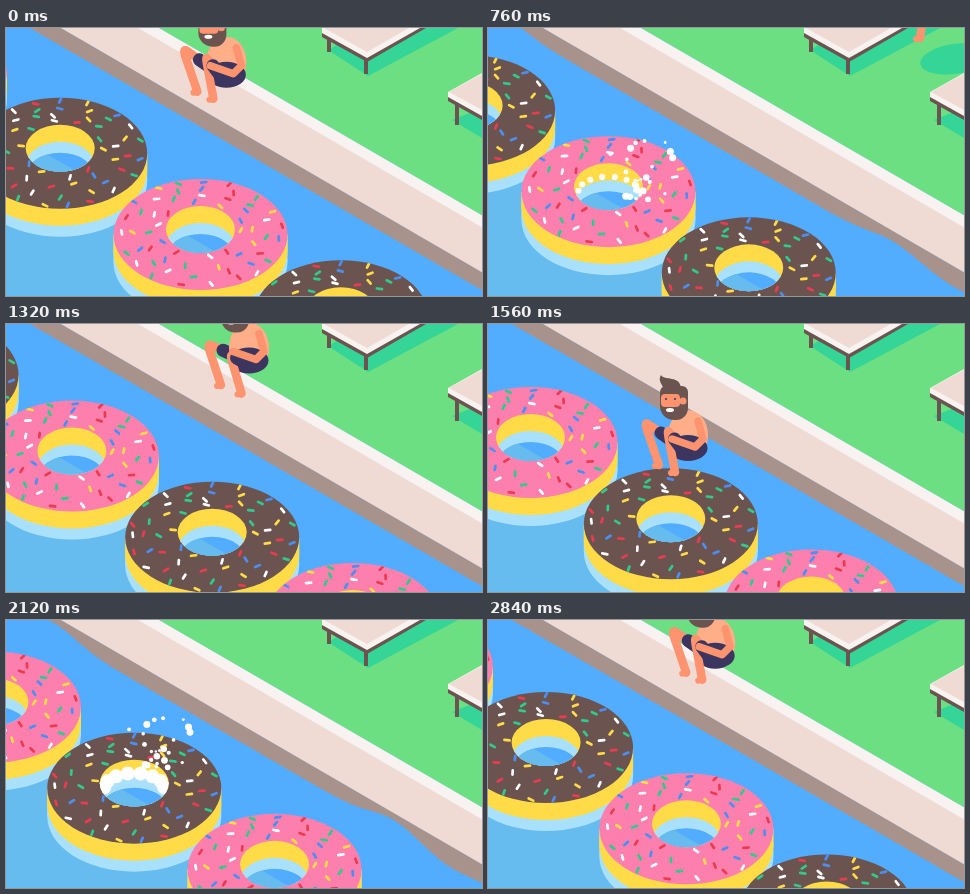
Write an HTML page with a canvas that moves like this. It is 476x268 px and loops after 2.88 s.

```html
<!DOCTYPE html>
<html lang="en">
<head>
<meta charset="utf-8">
<title>Pool jump</title>
<style>
html, body { margin: 0; width: 100%; height: 100%; overflow: hidden; background: #52acff; }
canvas { display: block; width: 100vw; height: 100vh; }
</style>
</head>
<body>
<canvas width="476" height="268"></canvas>
<script>
const ctx = document.querySelector('canvas').getContext('2d');
const W = 476, H = 268, LOOP = 2880, HALF = LOOP / 2, SLOPE = 0.58, TAU = Math.PI * 2;
const STEP_X = 140.3, STEP_Y = 81.2;
const RING = { rx: 87, ry: 55.5 }, HOLE = { rx: 34.5, ry: 23.5, lift: 5 };
const SIDE = 17, REFLECTION = 28, WALL_TOP = 55;
const C = {
  water: '#52acff', shallow: '#66bbef', foam: '#a9e1fc', grass: '#6bdf82', shade: '#35d497',
  deck: '#efdbd4', rim: '#f8f2f1', wall: '#a8928c', wood: '#6b544f', pink: '#fd7fad',
  yellow: '#ffdc47', skin: '#fd946f', back: '#ffae88', navy: '#3b355f', white: '#fff'
};
const SPRINKLES = [C.white, C.yellow, '#e93c50', '#31ca8d', '#4b8ff3'];

function seeded(seed) {
  return () => {
    seed = (seed * 16807) % 2147483647;
    return seed / 2147483647;
  };
}

function ellipse(x, y, rx, ry, color, turn = 0) {
  ctx.beginPath();
  ctx.ellipse(x, y, rx, ry, turn, 0, TAU);
  ctx.fillStyle = color;
  ctx.fill();
}

const dot = (x, y, r, color) => ellipse(x, y, r, r, color);

function trace(...p) {
  ctx.beginPath();
  for (let i = 0; i < p.length; i += 2) ctx.lineTo(p[i], p[i + 1]);
}

function poly(color, ...p) {
  trace(...p);
  ctx.closePath();
  ctx.fillStyle = color;
  ctx.fill();
}

function line(color, width, ...p) {
  trace(...p);
  ctx.strokeStyle = color;
  ctx.lineWidth = width;
  ctx.stroke();
}

function clipped(makePath, paint) {
  ctx.save();
  makePath();
  ctx.clip();
  paint();
  ctx.restore();
}

// Area between the slanted lines that cross y = 0 at x0 and x1.
function band(x0, x1) {
  trace(x0, 0, x1, 0, W, (W - x1) * SLOPE, W, (W - x0) * SLOPE);
}

function fillBand(color, x0, x1) {
  band(x0, x1);
  ctx.fillStyle = color;
  ctx.fill();
}

function water() {
  ctx.fillStyle = C.water;
  ctx.fillRect(0, 0, W, H);
  poly(C.shallow, 0, 102.5, 286, 268, 0, 268);
}

// Two ripples run along the wall, away from the drifting splash.
function ripple(x, p) {
  if (p < 260 || p > 940) return 0;
  const age = p - 400;
  const d = Math.abs(x - 245 + 0.1 * age) - 80 - 0.32 * age;
  const strength = Math.min(1, (p - 260) / 120) * Math.min(1, (940 - p) / 330);
  return strength * (5 * Math.exp(-(((d - 58) / 26) ** 2)) - 14 * Math.exp(-((d / 32) ** 2)));
}

function wall(p) {
  ctx.beginPath();
  ctx.moveTo(WALL_TOP, 0);
  ctx.lineTo(W, (W - WALL_TOP) * SLOPE);
  for (let x = W; x >= 0; x -= 4) ctx.lineTo(x, (x - 24) * SLOPE + ripple(x, p));
  ctx.lineTo(0, -28);
  ctx.fillStyle = C.wall;
  ctx.fill();
}

function loungers() {
  ctx.lineCap = 'butt';
  line(C.wood, 4, 323, 9, 323, 24);
  line(C.wood, 4, 360, 30, 360, 46);
  line(C.wood, 4, 451, 73, 451, 97);
  poly(C.wood, 316, 4, 361, 29, 361, 34, 316, 9);
  poly(C.wood, 361, 29, 411, 0, 420, 0, 361, 34);
  poly(C.rim, 316, 0, 414, 0, 361, 30, 316, 5);
  poly(C.deck, 318, 0, 403, 0, 361, 24);
  poly(C.wood, 442, 67, 476, 86, 476, 92, 442, 73);
  poly(C.rim, 442, 64, 476, 45, 476, 88, 442, 69);
  poly(C.deck, 443, 64, 476, 46, 476, 82);
}

function garden(shadow) {
  fillBand(C.grass, 153, 1000);
  poly(C.shade, 322, 22, 362, 48, 452, 0, 360, 0);
  poly(C.shade, 446, 92, 476, 110, 476, 80);
  if (shadow) shadow(C.shade);
  loungers();
  fillBand(C.deck, WALL_TOP, 133);
  fillBand(C.rim, 132, 153);
  if (shadow) clipped(() => band(WALL_TOP, 153), () => shadow('#d3c1bc'));
}

function makeSprinkles(seed) {
  const rnd = seeded(seed), list = [];
  [[0.13, 10], [0.38, 13], [0.64, 16], [0.89, 19]].forEach(([s, n], row) => {
    for (let i = 0; i < n; i++) {
      const a = (i + row * 0.4 + rnd() * 0.5) / n * TAU;
      const k = s + (rnd() - 0.5) * 0.12;
      list.push({
        x: Math.cos(a) * (HOLE.rx + (RING.rx - HOLE.rx) * k),
        y: Math.sin(a) * (HOLE.ry + (RING.ry - HOLE.ry) * k) - HOLE.lift * (1 - k),
        turn: rnd() * Math.PI,
        color: SPRINKLES[(i * 2 + row + Math.floor(rnd() * 2)) % 5]
      });
    }
  });
  return list;
}

const toppings = [
  { color: C.pink, sprinkles: makeSprinkles(71) },
  { color: C.wood, sprinkles: makeSprinkles(523) }
];

function ringPath(x, y) {
  ctx.beginPath();
  ctx.ellipse(x, y, RING.rx, RING.ry, 0, 0, TAU);
}

function holePath(x, y) {
  ctx.beginPath();
  ctx.ellipse(x, y - HOLE.lift, HOLE.rx, HOLE.ry, 0, 0, TAU);
}

function ring(x, y, topping) {
  const fill = (path, drop, color) => {
    path(x, y + drop);
    ctx.fillStyle = color;
    ctx.fill();
  };
  const side = (color, drop) => {
    fill(ringPath, drop, color);
    ctx.fillRect(x - RING.rx, y, RING.rx * 2, drop);
  };
  side(C.foam, REFLECTION);
  side(C.yellow, SIDE);
  fill(ringPath, 0, topping.color);
  ctx.lineCap = 'round';
  clipped(() => ringPath(x, y), () => {
    for (const s of topping.sprinkles) {
      const dx = Math.cos(s.turn) * 2.6, dy = Math.sin(s.turn) * 2.1;
      line(s.color, 2.7, x + s.x - dx, y + s.y - dy, x + s.x + dx, y + s.y + dy);
    }
  });
  fill(holePath, 0, C.yellow);
  clipped(() => holePath(x, y), () => {
    fill(holePath, SIDE, C.foam);
    clipped(() => holePath(x, y + REFLECTION), water);
  });
}

// Everything above the front lip of the hole.
function aboveLip(x, y) {
  ctx.beginPath();
  ctx.rect(0, -200, W, 200 + y - HOLE.lift);
  ctx.ellipse(x, y - HOLE.lift, HOLE.rx, HOLE.ry, 0, 0, Math.PI);
}

const drops = (() => {
  const rnd = seeded(97);
  return Array.from({ length: 24 }, (_, i) => ({
    start: (i / 23 - 0.5) * 60,
    drift: (rnd() - 0.5) * 0.06,
    lift: 0.4 + rnd() * 0.13,
    r: 1.2 + rnd() * 2.5
  }));
})();

function splash(x, y, p) {
  const cy = y - HOLE.lift;
  if (p > 190 && p < 630) {
    const h = 38 * Math.sin((p - 190) / 440 * Math.PI);
    clipped(() => aboveLip(x, y), () => {
      ellipse(x, cy, 34, HOLE.ry, C.white);
      ctx.fillRect(x - 34, cy - h + 8, 68, h);
      for (let i = 0; i < 8; i++) {
        const a = i / 7 * Math.PI;
        dot(x - Math.cos(a) * 26, cy - h + 7 - Math.sin(a) * 5 - (i * 5 % 4) * 1.6, 7.5 + i % 3, C.white);
      }
    });
  }
  if (p >= 560 && p < 820) {
    const r = 7 * Math.min(1, (820 - p) / 140);
    clipped(() => holePath(x, y), () => {
      for (let i = 0; i < 8; i++) {
        const a = Math.PI * (1.02 + i / 7 * 0.96);
        dot(x + Math.cos(a) * 30, cy + 5 + Math.sin(a) * 15, r, C.white);
      }
    });
  }
  const age = p - 260;
  if (age <= 0) return;
  for (const d of drops) {
    const up = d.lift * age - 0.00077 * age * age;
    if (up > 0) dot(156 + d.start * (1 - age / 1300) + d.drift * age, 183 - up, d.r, C.white);
  }
}

// time, body x y, then far knee, far foot, near knee, near foot relative to the body
const POSES = [
  [760, 467, -75, 10, 45, 40, 60, -28, 42, -35, 85],
  [880, 409, -33, -5, 48, 0, 88, 0, 45, 25, 70],
  [1000, 350, 8, -30, 42, -37, 84, 13, 50, 41, 59],
  [1080, 311, 38, -34, 48, -23, 87, 13, 46, 24, 47],
  [1160, 284, 50, -30, 40, 2, 74, -20, 30, 0, 60],
  [1280, 250, 28, -38, 5, -25, 45, -15, 20, 0, 55],
  [1360, 232, 19, -42, -14, -27, 30, -19, -6, -11, 37]
];

function poseAt(t) {
  const last = POSES[POSES.length - 1];
  if (t >= last[0]) {
    const fall = t - last[0];
    return [t, last[1] - 0.17 * fall, last[2] + 0.0023 * fall * fall, ...last.slice(3)];
  }
  const i = POSES.findIndex(k => k[0] > t);
  const a = POSES[i - 1], b = POSES[i], u = (t - a[0]) / (b[0] - a[0]);
  return a.map((v, j) => v + (b[j] - v) * u);
}

function leg(hx, hy, kx, ky, fx, fy) {
  const thigh = u => [hx + (kx - hx) * u, hy + (ky - hy) * u];
  ctx.lineCap = ctx.lineJoin = 'round';
  ctx.beginPath();
  ctx.moveTo(hx, hy);
  ctx.lineTo(...thigh(0.85));
  ctx.quadraticCurveTo(kx, ky, kx + (fx - kx) * 0.2, ky + (fy - ky) * 0.2);
  ctx.lineTo(fx, fy);
  ctx.strokeStyle = C.skin;
  ctx.lineWidth = 8.5;
  ctx.stroke();
  line(C.skin, 6, fx, fy, fx - 4, fy + 1);
  line(C.navy, 13, hx, hy, ...thigh(0.5));
}

function head() {
  ctx.beginPath();
  ctx.roundRect(-26, -49, 28, 34, [6, 6, 12, 14]);
  ctx.fillStyle = C.wood;
  ctx.fill();
  ctx.beginPath();
  ctx.roundRect(-25, -41, 19, 13, 4);
  ctx.fillStyle = C.skin;
  ctx.fill();
  dot(-3, -34, 3.5, C.skin);
  ctx.beginPath();
  ctx.moveTo(-25, -42);
  ctx.bezierCurveTo(-18, -48, -30, -52, -25, -60);
  ctx.bezierCurveTo(-22, -54, -6, -60, -5, -47);
  ctx.lineTo(0, -42);
  ctx.fillStyle = C.wood;
  ctx.fill();
  dot(-20, -36, 1, C.navy);
  dot(-11, -36, 1, C.navy);
  ellipse(-16, -25, 4, 2, C.white);
}

function man(pose) {
  const [, x, y, ...legs] = pose;
  ctx.save();
  ctx.translate(x, y);
  leg(-8, 10, ...legs.slice(0, 4));
  ellipse(2, 0, 20, 25, C.back);
  ellipse(2, 13, 19.5, 13, C.navy);
  leg(-4, 14, ...legs.slice(4));
  line(C.skin, 7.5, 12, -14, 17, 4, 9, 12, -14, 4);
  head();
  ctx.restore();
}

function draw(t) {
  const round = Math.floor(t / HALF), p = t % HALF;
  const x = 194.5 - STEP_X * p / HALF, y = 206.5 - STEP_Y * p / HALF;
  const q = p < 300 ? p + HALF : p;
  const pose = q >= 760 ? poseAt(q) : null;
  const shadow = pose && q < 1240
    ? color => ellipse(pose[1], 100 + (350 - pose[1]) * 0.59, 35, 15, color, -0.14)
    : null;

  water();
  wall(p);
  garden(shadow);
  for (let k = -2; k <= 3; k++) {
    ring(x + k * STEP_X, y + k * STEP_Y, toppings[Math.abs(k + round) % 2]);
  }
  if (pose && q < HALF + 110) man(pose);
  else if (pose) clipped(() => aboveLip(x, y), () => man(pose));
  splash(x, y, p);
}

const start = performance.now();
function tick() {
  const t = (performance.now() - start) % LOOP;
  draw(Math.floor(t / 40) * 40);
  requestAnimationFrame(tick);
}
tick();
</script>
</body>
</html>
```
